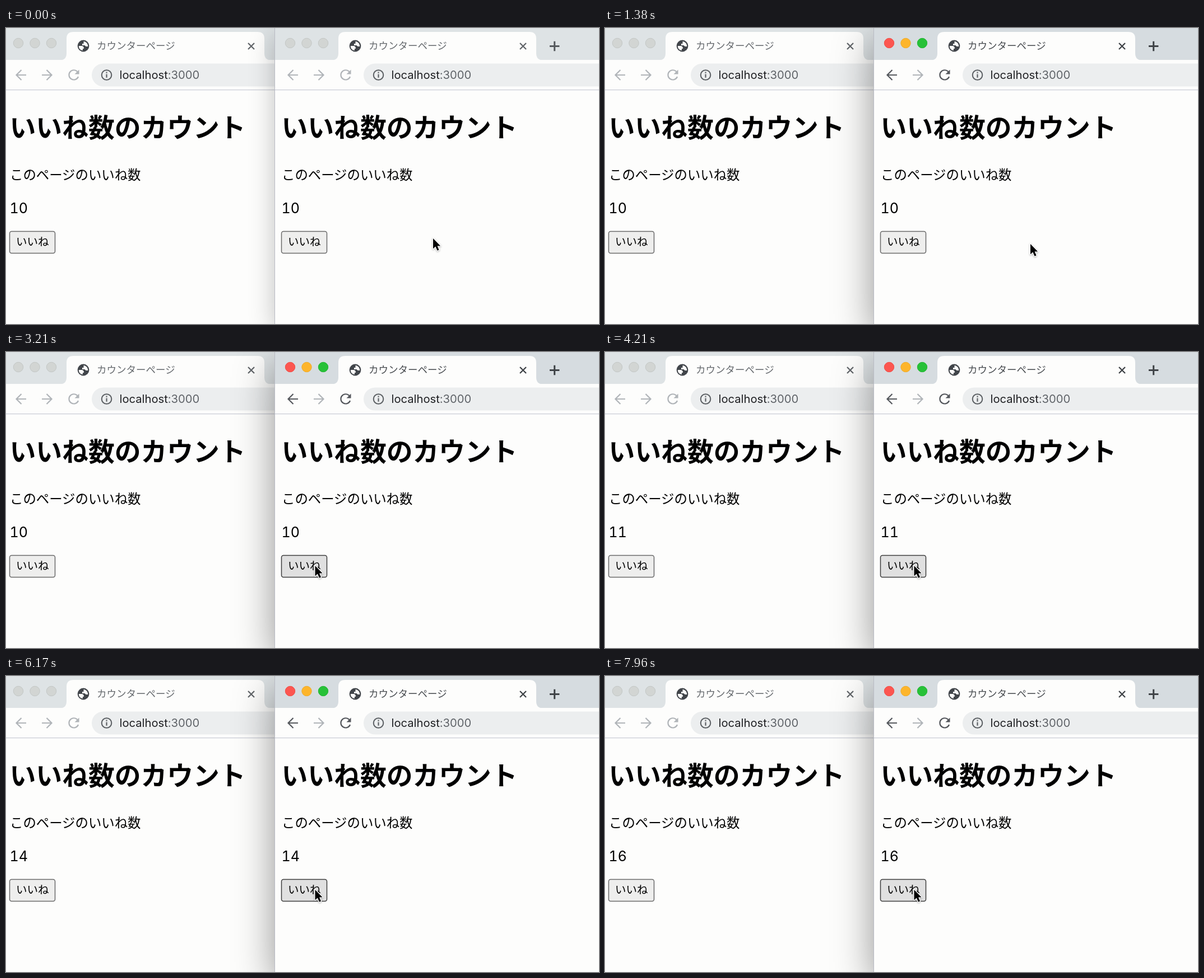
Write an HTML page that moves like this. It is 1058x529 px and loops after 8 s.

```html
<!DOCTYPE html>
<html lang="ja">
<head>
<meta charset="utf-8">
<style>
html, body { margin: 0; width: 100%; height: 100%; overflow: hidden; background: #fdfdfc; }
#stage { position: absolute; left: 0; top: 0; width: 1058px; height: 529px; overflow: hidden; }
.win { position: absolute; top: 0; height: 529px; background: #fdfdfc; }
.win svg, #cursor { position: absolute; left: 0; top: 0; display: block; }
#left { left: 0; width: 479px; overflow: hidden; }
#right { left: 479px; width: 579px; box-shadow: 0 12px 44px rgba(0,0,0,.24); }
#right.active { box-shadow: 0 22px 66px rgba(0,0,0,.42); }
#cursor { overflow: visible; filter: drop-shadow(0 1.5px 1.5px rgba(0,0,0,.3)); }

text { font-family: "Noto Sans CJK JP", "Noto Sans CJK", sans-serif; fill: #000; }
.title { font-size: 17.5px; fill: #64686c; }
.url { font-family: Inter, Roboto, sans-serif; font-size: 20.2px; fill: #202124; }
.url tspan { fill: #5f6368; }
.head { font-size: 46.8px; font-weight: 700; }
.body { font-size: 23.4px; }
.count { font-family: Inter, "Noto Sans", sans-serif; font-size: 25px; font-feature-settings: "tnum"; }
.label { font-size: 19.5px; }

.strip { fill: #dee3e5; }
.light { fill: #d2d5d3; stroke: #c3c7c5; stroke-width: 1; }
.icon { fill: none; stroke: #b0b4b8; stroke-width: 2.2; }
.tip { fill: #b0b4b8; }
.cross { fill: none; stroke: #62666a; stroke-width: 2.3; }
.plus { fill: none; stroke: #55595d; stroke-width: 3; }
.button { fill: #eeeeed; stroke: #6a6a6a; stroke-width: 1.5; }
.hover .button { fill: #e0e0e0; stroke: #3e3e3e; }

.active .strip { fill: #d6dce0; }
.active .title { fill: #45494d; }
.active .on { stroke: #54575c; }
.active .tip { fill: #54575c; }
.active .cross, .active .plus { stroke: #3f4347; }
.active .l0 { fill: #fc5650; stroke: #ee4e47; }
.active .l1 { fill: #fdb52b; stroke: #eeab2a; }
.active .l2 { fill: #27c138; stroke: #23b633; }
</style>
</head>
<body>
<div id="stage">
  <div id="left" class="win"></div>
  <div id="right" class="win"></div>
  <svg id="cursor" width="20" height="30">
    <path d="M0 0V17.2L4 13.5L6.9 20.2L9.8 19L7 12.4H12.2Z" transform="scale(1.08)"
      fill="#000" stroke="#fff" stroke-width="2.4" stroke-linejoin="round" paint-order="stroke"/>
  </svg>
</div>
<script>
const LOOP = 8000;
const ACTIVATE = 1090;
const FIRST = 10;
const LIKES = [3800, 4550, 5250, 5950, 6700, 7500];
// time, x, y of the pointer tip
const PATH = [
  [0, 762, 376],
  [150, 762, 376],
  [800, 759, 386],
  [1500, 759, 386],
  [2700, 551.5, 382],
  [LOOP, 551.5, 382],
];

const lights = [22, 51.5, 81]
  .map((x, i) => `<circle class="light l${i}" cx="${x}" cy="27" r="8.7"/>`).join('');

const globe = `
  <circle cx="138" cy="32" r="10.4" fill="#41454a"/>
  <path d="M138.5 24C143.5 24.5 146.2 28.5 146.2 33H142.5L140.5 31H136V28H138.5Z
    M129.8 32H136Q139 33 139 36.5L136.8 37.5V40.2C132.5 39.5 129.8 36.5 129.8 32Z" fill="#fdfdfc"/>`;

// One browser window; x = 0 is 6px inside its left edge
const browser = (x, plus) => `
<svg width="579" height="529" viewBox="${x} 0 579 529">
  <rect class="strip" x="-6" width="600" height="57"/>
  ${lights}
  <path d="M96 57.5Q108 57.5 108 45V19Q108 7 120 7H449Q461 7 461 19V45Q461 57.5 473 57.5Z" fill="#fdfdfc"/>
  ${globe}
  <text class="title" x="162" y="37.5">カウンターページ</text>
  <path class="cross" d="M432 27l11 11m0-11l-11 11"/>
  ${plus ? '<path class="plus" d="M485 32.5h17.4m-8.7-8.7v17.4"/>' : ''}
  <rect x="-6" y="57" width="600" height="53" fill="#fdfdfc"/>
  <path class="icon on" d="M36 84H18.5m9-9l-9 9l9 9"/>
  <path class="icon" d="M64 84h17.5m-9-9l9 9l-9 9"/>
  <path class="icon on" d="M127.3 78A8.6 8.6 0 1 0 129 87"/>
  <path class="tip" d="M130.5 74.5V82.5H122.5Z"/>
  <rect x="153" y="63.5" width="460" height="41" rx="20.5" fill="#eceeef"/>
  <circle cx="179.5" cy="84" r="8.8" fill="none" stroke="#5b5f63" stroke-width="2"/>
  <path d="M179.5 82.5v6.2m0-10.2v2.2" stroke="#5b5f63" stroke-width="2.1"/>
  <text class="url" x="202.5" y="91">localhost<tspan>:3000</tspan></text>
  <rect x="-6" y="110" width="600" height="1.2" fill="#c8cad4"/>
  <text class="head" x="6.5" y="194.8">いいね数のカウント</text>
  <text class="body" x="7" y="271.2">このページのいいね数</text>
  <text class="count" x="6.5" y="330.5">10</text>
  <rect class="button" x="6.5" y="363.5" width="81" height="39" rx="3.5"/>
  <text class="label" x="18" y="388.7">いいね</text>
  <rect x="-6" width="1" height="529" fill="#b9bbc4"/>
</svg>`;

const left = document.getElementById('left');
const right = document.getElementById('right');
const cursor = document.getElementById('cursor');
left.innerHTML = browser(0, false);
right.innerHTML = browser(-6, true);
const counts = document.querySelectorAll('.count');

const ease = (k) => k * k * (3 - 2 * k);

function pointerAt(t) {
  const i = Math.max(1, PATH.findIndex((p) => p[0] > t));
  const [t0, x0, y0] = PATH[i - 1];
  const [t1, x1, y1] = PATH[i];
  const k = ease((t - t0) / (t1 - t0));
  return [x0 + (x1 - x0) * k, y0 + (y1 - y0) * k];
}

function draw(t) {
  const [x, y] = pointerAt(t);
  cursor.style.transform = `translate(${x}px, ${y}px)`;
  right.classList.toggle('active', t >= ACTIVATE);
  right.classList.toggle('hover', x < 573);
  const likes = FIRST + LIKES.filter((at) => t >= at).length;
  counts.forEach((c) => { c.textContent = likes; });
}

const start = performance.now();
function tick() {
  draw((performance.now() - start) % LOOP);
  requestAnimationFrame(tick);
}
draw(0);
requestAnimationFrame(tick);
</script>
</body>
</html>
```
